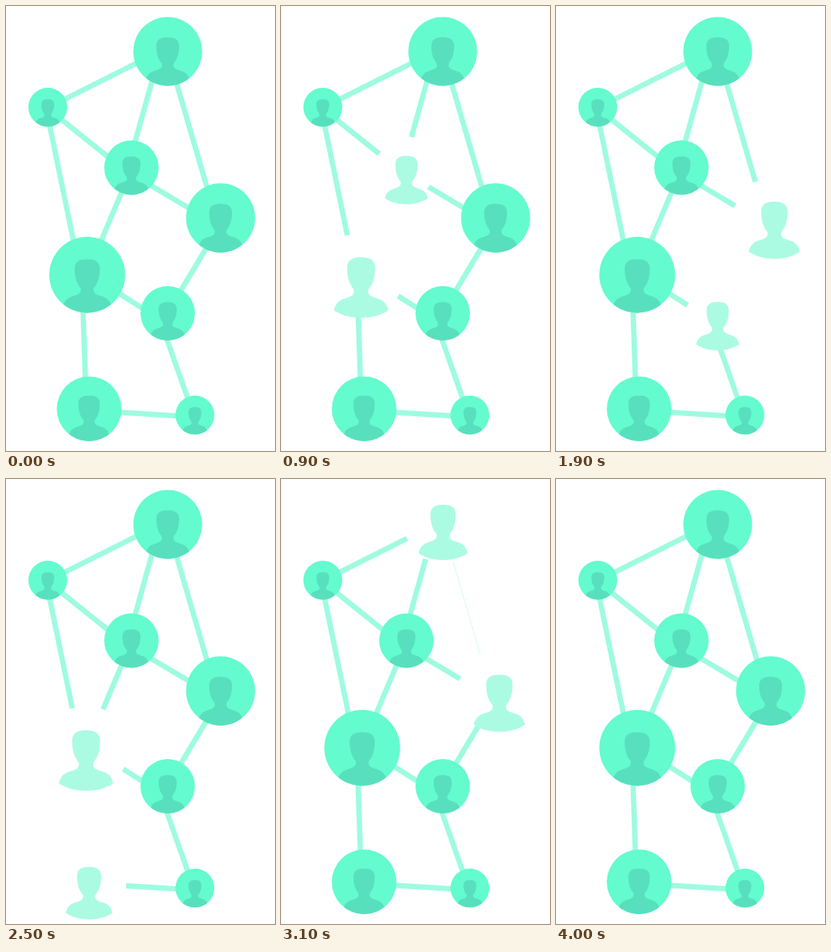
An HTML page with a canvas for the animation above (4.1 s loop, 356x588 px).

```html
<!DOCTYPE html>
<html lang="en">
<head>
<meta charset="utf-8">
<title>People network</title>
<style>
  html, body { margin: 0; width: 100%; height: 100%; overflow: hidden; background: #fff; }
  canvas { display: block; }
</style>
</head>
<body>
<canvas id="stage" width="356" height="588"></canvas>
<script>
const ctx = document.getElementById('stage').getContext('2d');
const LOOP = 4100, STEP = 100, HOP = 200;
const DISC = '#64fbcf', LINE = '#9efbe0', INNER = '#58e0be', BARE = '#abfbe3';

// x, y, r: disc; bare: centre x, top, width, height of the lone figure; gap: line cut beside it
const nodes = {
  A: { x: 214, y: 60, r: 45.5, bare: [214.5, 34, 65, 73], gap: 6 },
  T: { x: 55.3, y: 133.7, r: 25.7, bare: [61, 122, 48, 54], gap: 18 },
  B: { x: 166, y: 213.5, r: 36, bare: [166, 198, 57, 64], gap: 6 },
  E: { x: 284, y: 280, r: 45.7, bare: [289, 258.5, 68, 75.5], gap: 6 },
  C: { x: 107.5, y: 355.2, r: 50.2, bare: [106, 332, 72, 80], gap: 6 },
  F: { x: 214, y: 406, r: 36, bare: [214, 391, 57, 64], gap: 7 },
  G: { x: 110, y: 532.3, r: 42.8, bare: [110, 512.5, 62, 69.5], gap: 7 },
  H: { x: 250, y: 540.5, r: 25.7, bare: [250, 527, 46, 51], gap: 8 }
};

// Node pair, then the points where the line meets the two discs
const links = [
  ['TA', 78, 123, 172, 76],
  ['TB', 74, 150.5, 134.5, 199],
  ['TC', 58, 159, 89, 309],
  ['AB', 193, 100, 171, 179],
  ['AE', 226, 103, 265.5, 238],
  ['BE', 190, 236, 242, 267],
  ['BC', 153, 246, 126, 310],
  ['EF', 265, 320, 232, 375],
  ['CF', 150, 380, 180, 399],
  ['CG', 102, 404, 105, 491],
  ['GH', 152, 537, 225, 541.5],
  ['FH', 213.5, 442, 240, 517]
];

// Nodes visited by the pulse, one every HOP ms
const route = 'GHFCBATBEFHGCTAEFHG';

const person = new Path2D();
person.moveTo(0, 0);
person.bezierCurveTo(12, 0, 18.5, 4, 18.5, 14);
person.bezierCurveTo(18.5, 28, 15, 36, 10, 42);
person.bezierCurveTo(8, 48, 11, 51, 17, 53);
person.bezierCurveTo(28, 56, 33, 59, 36, 70);
person.bezierCurveTo(26, 77, 13, 80, 0, 80);
person.bezierCurveTo(-13, 80, -26, 77, -36, 70);
person.bezierCurveTo(-33, 59, -28, 56, -17, 53);
person.bezierCurveTo(-11, 51, -8, 48, -10, 42);
person.bezierCurveTo(-15, 36, -18.5, 28, -18.5, 14);
person.bezierCurveTo(-18.5, 4, -12, 0, 0, 0);

function drawPerson(x, top, width, height, color) {
  ctx.save();
  ctx.translate(x, top);
  ctx.scale(width / 72, height / 80);
  ctx.fillStyle = color;
  ctx.fill(person);
  ctx.restore();
}

function drawNode({ x, y, r, bare }, isOut) {
  if (isOut) return drawPerson(...bare, BARE);
  ctx.save();
  ctx.beginPath();
  ctx.arc(x, y, r, 0, 2 * Math.PI);
  ctx.fillStyle = DISC;
  ctx.fill();
  ctx.clip();
  drawPerson(x, y - 0.41 * r, 1.29 * r, 1.43 * r, INNER);
  ctx.restore();
}

function drawLink([pair, x1, y1, x2, y2], out, hidden) {
  const isHidden = hidden.has(pair);
  // Two of the collapsed lines leave a hairline behind
  if (isHidden && pair !== 'TA' && pair !== 'AE') return;
  const length = Math.hypot(x2 - x1, y2 - y1);
  const ux = (x2 - x1) / length, uy = (y2 - y1) / length;
  const [start, end] = [...pair].map(id => out.has(id) ? nodes[id].gap : -8);
  ctx.beginPath();
  ctx.moveTo(x1 + ux * start, y1 + uy * start);
  ctx.lineTo(x2 - ux * end, y2 - uy * end);
  ctx.strokeStyle = LINE;
  ctx.lineWidth = isHidden ? 0.5 : 7;
  ctx.stroke();
}

function draw(time) {
  const t = Math.floor(time % LOOP / STEP) * STEP;
  const out = new Set(), hidden = new Set();
  [...route].forEach((id, i) => {
    const age = t - STEP - i * HOP;
    if (age >= 0 && age < 300) out.add(id);
    const next = route[i + 1];
    if (next && age >= 100 && age < 400) hidden.add(id + next).add(next + id);
  });
  ctx.clearRect(0, 0, 356, 588);
  links.forEach(link => drawLink(link, out, hidden));
  for (const id in nodes) drawNode(nodes[id], out.has(id));
}

function tick() {
  draw(performance.now());
  requestAnimationFrame(tick);
}
tick();
</script>
</body>
</html>
```
